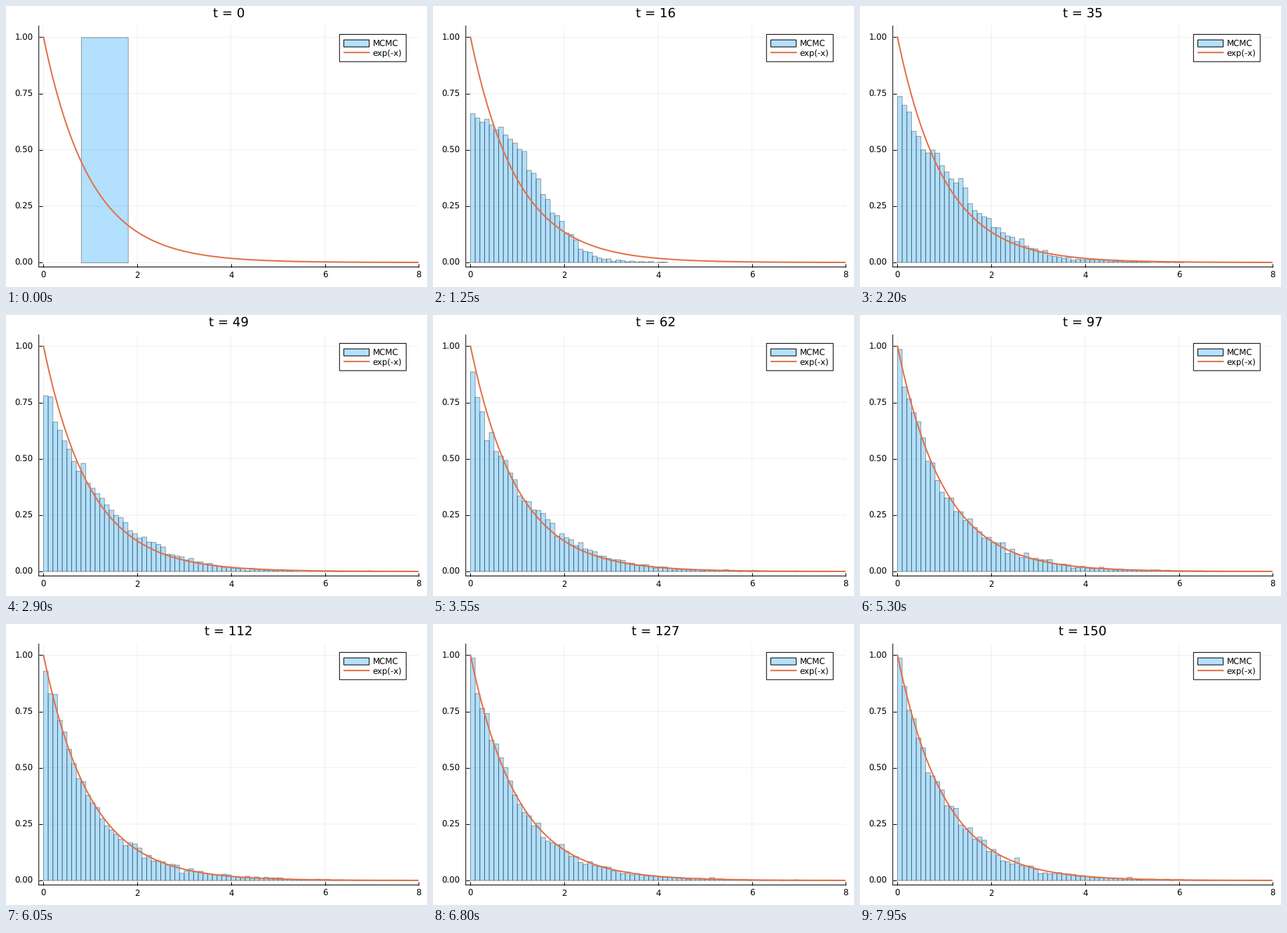
A matplotlib script that plays this animation: 600x400 px, repeating every 8000 ms.

```python
import numpy as np
import matplotlib.pyplot as plt
from matplotlib.animation import FuncAnimation
from matplotlib.collections import PolyCollection
from matplotlib.lines import Line2D
from matplotlib.patches import Rectangle

W, H, DPI = 600, 400, 100
PX = 72 / DPI
LEFT, RIGHT, TOP, BOTTOM = 46.75, 588.2, 28.4, 371.5
X_LIM, Y_LIM = (-0.1, 8), (-0.02, 1.05)
ORANGE = "#E26F46"
FILL = (0, 0.604, 0.98, 0.3)
EDGE = (0, 0, 0, 0.35)

STEP_MS, HOLD, LAST_T = 50, 10, 150
WALKERS, START = 10000, 0.8

plt.rcParams["font.family"] = "DejaVu Sans"
plt.rcParams["text.hinting"] = "none"


def simulate():
    """Walkers spread from START and settle into the exponential law."""
    rng = np.random.default_rng(12)
    walk = np.full(WALKERS, START)
    pair = rng.normal(size=(2, WALKERS))
    switch = rng.random(WALKERS)
    rho = 0.97
    states = [walk]
    for t in range(1, LAST_T + 1):
        walk = np.abs(walk + rng.normal(0, 0.19, WALKERS))
        pair = rho * pair + np.sqrt(1 - rho**2) * rng.normal(size=pair.shape)
        settled = (pair**2).sum(axis=0) / 2
        mixed = 1 - np.exp(-((t / 48) ** 1.7))
        reach = 1.05 * np.sqrt(t)
        states.append(np.where((switch < mixed) & (settled < reach), settled, walk))
    return states


def bin_edges(x):
    """Freedman-Diaconis bins rounded to 1, 2 or 5 times a power of ten."""
    lo, hi = x.min(), x.max()
    if lo == hi:
        return np.array([lo, lo + 1])
    q1, q3 = np.percentile(x, [25, 75])
    raw = 2 * (q3 - q1) / len(x) ** (1 / 3)
    base = 10.0 ** np.floor(np.log10(raw))
    ratio = raw / base
    width = base * (1 if ratio <= 1.4 else 2 if ratio <= 2.2 else 5 if ratio <= 5.5 else 10)
    return np.arange(np.floor(lo / width), np.floor(hi / width) + 2) * width


def bar_shapes(x):
    edges = bin_edges(x)
    heights, _ = np.histogram(x, edges, density=True)
    return [[(a, 0), (a, h), (b, h), (b, 0)]
            for a, b, h in zip(edges[:-1], edges[1:], heights)]


fig = plt.figure(figsize=(W / DPI, H / DPI), dpi=DPI, facecolor="white")


def label(x, y, text, size=11.7, ha="left"):
    return fig.text(x / W, 1 - y / H, text, fontsize=size * PX,
                    ha=ha, va="baseline", color="black", zorder=9)


ax = fig.add_axes([LEFT / W, 1 - BOTTOM / H, (RIGHT - LEFT) / W, (BOTTOM - TOP) / H])
ax.set_xlim(X_LIM)
ax.set_ylim(Y_LIM)
ax.set_xticks(range(0, 9, 2))
ax.set_yticks(np.arange(5) / 4)
ax.tick_params(direction="in", length=5 * PX, width=PX,
               labelleft=False, labelbottom=False)
ax.set_axisbelow(True)
ax.grid(color="black", alpha=0.1, linewidth=0.6 * PX, snap=False)
for side in ("top", "right"):
    ax.spines[side].set_visible(False)
for side in ("left", "bottom"):
    ax.spines[side].set_linewidth(PX)
    ax.spines[side].set_snap(False)
for line in ax.get_xticklines() + ax.get_yticklines():
    line.set_snap(False)

for v in range(0, 9, 2):
    px = LEFT + (v - X_LIM[0]) / (X_LIM[1] - X_LIM[0]) * (RIGHT - LEFT)
    label(px, 387, str(v), ha="center")
for v in np.arange(5) / 4:
    py = BOTTOM - (v - Y_LIM[0]) / (Y_LIM[1] - Y_LIM[0]) * (BOTTOM - TOP)
    label(38.7, py + 4.2, f"{v:.2f}", ha="right")

bars = PolyCollection([], facecolors=[FILL], edgecolors=[EDGE], linewidths=PX, zorder=2)
bars.set_snap(False)
ax.add_collection(bars, autolim=False)
xs = np.linspace(0, 8, 400)
ax.plot(xs, np.exp(-xs), color=ORANGE, linewidth=2 * PX, zorder=3)


def box(x0, y0, x1, y1, color):
    fig.add_artist(Rectangle((x0 / W, 1 - y1 / H), (x1 - x0) / W, (y1 - y0) / H,
                             transform=fig.transFigure, facecolor=color, snap=False,
                             edgecolor="black", linewidth=PX, zorder=6))


box(475.3, 40.4, 570.3, 79.2, "white")
box(481.4, 48.2, 517.6, 58.2, "#B3E1FE")
fig.add_artist(Line2D([481 / W, 518.5 / W], [1 - 66.2 / H] * 2, color=ORANGE, snap=False,
                      linewidth=2 * PX, solid_capstyle="butt", zorder=7))
label(522.5, 57.5, "MCMC")
label(522.5, 70.5, "exp(-x)")
title = label((LEFT + RIGHT) / 2, 15.8, "t = 0", size=18.2, ha="center")

shapes = [bar_shapes(x) for x in simulate()]


def update(frame):
    t = max(0, frame - HOLD + 1)
    bars.set_verts(shapes[t])
    title.set_text(f"t = {t}")
    return bars, title


anim = FuncAnimation(fig, update, frames=HOLD + LAST_T, interval=STEP_MS,
                     init_func=lambda: update(0), repeat=True, repeat_delay=0)
plt.show()
```
